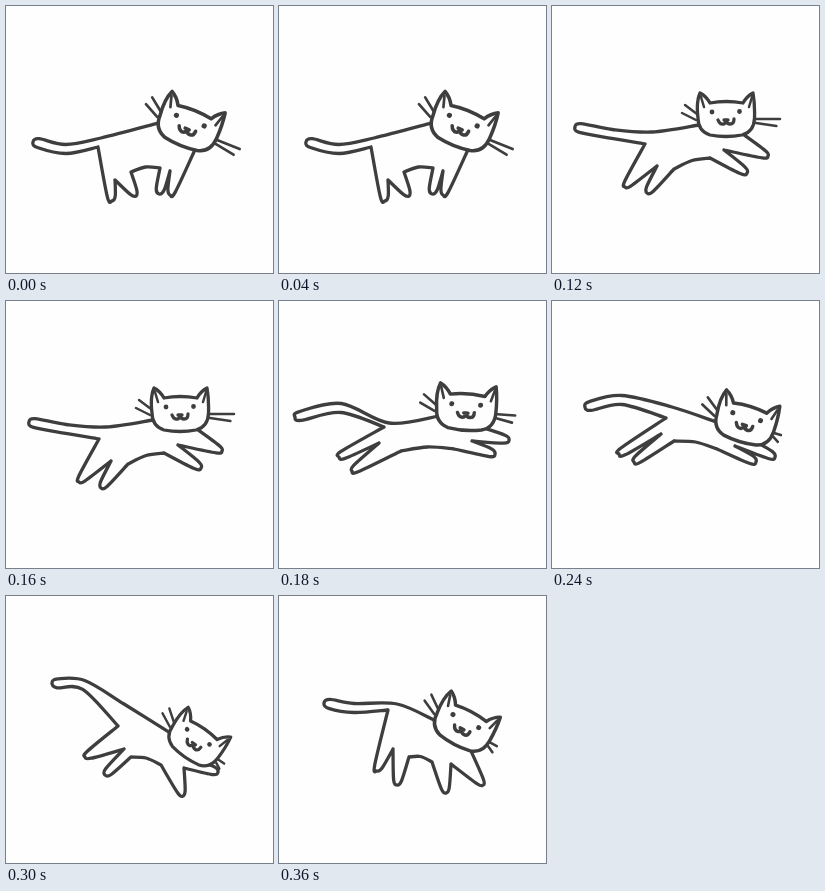
Animation, 267 px wide and 267 px high, one loop 420 ms. Source, as an HTML page:

```html
<!DOCTYPE html>
<html lang="en">
<head>
<meta charset="utf-8">
<title>Running cat</title>
<style>
html, body { margin: 0; width: 100%; height: 100%; overflow: hidden; background: #fefefe; }
svg { display: block; width: 100%; height: 100%; filter: blur(.45px); }
path { fill: none; stroke: #3e3e3e; stroke-width: 3.3; stroke-linecap: round; stroke-linejoin: round; }
#face { fill: #fefefe; }
#eyes { stroke-width: 4.8; }
#ears, #whiskers { stroke-width: 2.5; }
</style>
</head>
<body>
<svg viewBox="0 0 267 267">
  <path id="body"/>
  <g id="head">
    <path id="face" d="M-28 0Q-30 -16 -26 -25Q-20 -22 -16 -15Q0 -18 17 -15Q21 -22 27 -25Q29 -14 28.5 0Q28 14 16 17Q0 20 -16 17Q-28 13 -28 0Z"/>
    <path id="ears" d="M-25 -21L-22 -11M26 -21L23 -11"/>
    <path id="eyes" d="M-14 -6h.01M13.5 -6.5h.01"/>
    <path id="mouth" d="M-8 2Q-6 7 -2 6Q0 5 0 2Q1 6 4 6Q8 6 8 1M-2 2h4"/>
    <path id="whiskers"/>
  </g>
</svg>
<script>
const HOLD = 60, TAIL = 4.5, PAW = 4;

// head: x, y, angle, scale, length of the right whiskers
// joints, around the outline: tail root, bend, tip, rump,
// hind paw, crotch, hind paw, groin, chest, fore paw, crotch, fore paw
const poses = [
  { head: [182, 121, 22, 1.08, 22],
    joints: "95,132 60,143 27,136 92,141 106,195 109,174 130,190 125,166 154,162 153,188 164,165 164,189" },
  { head: [179, 116, 8, 1.1, 20],
    joints: "95,137 68,145 37,129 94,147 81,197 105,167 106,200 115,172 152,156 174,181 165,149 204,161" },
  { head: [174, 112, 0, 1, 24],
    joints: "100,126 60,128 23,121 93,138 73,181 105,160 95,187 122,163 158,152 195,167 172,144 216,150" },
  { head: [187, 110, 4, 1.05, 17],
    joints: "110,122 62,107 16,116 105,126 60,156 100,142 73,170 122,150 175,148 216,153 193,140 230,139" },
  { head: [193, 122, 17, 1.05, 6],
    joints: "120,106 70,99 33,106 114,117 67,153 109,133 82,161 122,140 165,148 204,161 183,145 223,156" },
  { head: [189, 146, 35, .98, 7],
    joints: "118,108 78,89 46,87 112,130 79,161 118,153 99,179 125,161 155,169 177,200 178,172 212,176" },
  { head: [184, 131, 28, 1.05, 7],
    joints: "118,108 75,112 45,107 109,114 98,175 114,153 118,189 130,161 153,166 167,197 172,168 204,189" }
];

const middle = (a, b) => [(a[0] + b[0]) / 2, (a[1] + b[1]) / 2];

// Point reached from p by going along and across the direction a to b
function offset(p, a, b, along, across) {
  const dx = b[0] - a[0], dy = b[1] - a[1], len = Math.hypot(dx, dy);
  return [p[0] + (dx * along - dy * across) / len, p[1] + (dy * along + dx * across) / len];
}

// Three points that round off a limb
const round = (from, tip, r) =>
  [offset(tip, from, tip, -1.2 * r, r), tip, offset(tip, from, tip, -1.2 * r, -r)];

const leg = (a, paw, b) => [a, ...round(middle(a, b), paw, PAW), b];

// Catmull-Rom curve through the points, as cubic Béziers
function curve(p) {
  const at = i => p[Math.max(0, Math.min(p.length - 1, i))];
  const handle = (i, side) => at(i).map((v, k) => v + side * (at(i + 1)[k] - at(i - 1)[k]) / 6);
  let d = "M" + p[0];
  for (let i = 1; i < p.length; i++) d += `C${handle(i - 1, 1)} ${handle(i, -1)} ${p[i]}`;
  return d;
}

function outline({ head: [x, y, angle, scale], joints }) {
  const [root, bend, tip, rump, hind1, hindGap, hind2, groin, chest, fore1, foreGap, fore2] =
    joints.split(" ").map(s => s.split(",").map(Number));
  const c = scale * Math.cos(angle * Math.PI / 180), s = scale * Math.sin(angle * Math.PI / 180);
  const onHead = (u, v) => [x + u * c - v * s, y + u * s + v * c];
  const neck = onHead(-27, 7), throat = onHead(14, 14);
  const [bx, by] = middle(groin, chest);
  const tailSide = side => offset(bend, root, tip, 0, side * TAIL);
  return [
    [neck, root, tailSide(1), ...round(bend, tip, TAIL), tailSide(-1), rump],
    leg(rump, hind1, hindGap),
    leg(hindGap, hind2, groin),
    [groin, [bx, by - 3], chest],
    leg(chest, fore1, foreGap),
    leg(foreGap, fore2, throat)
  ].map(curve).join("");
}

const set = (id, name, value) => document.getElementById(id).setAttribute(name, value);
let shown = -1;

function draw(now) {
  const i = Math.floor(now / HOLD) % poses.length;
  if (i === shown) return;
  shown = i;
  const [x, y, angle, scale, whisker] = poses[i].head;
  set("body", "d", outline(poses[i]));
  set("head", "transform", `translate(${x} ${y}) rotate(${angle}) scale(${scale})`);
  set("whiskers", "d", `M-44 -5L-30 2M-41 -13L-29 -4M30 1h${whisker}M30 5l${whisker * .85} 3`);
}

const start = performance.now();
function tick() {
  draw(performance.now() - start);
  requestAnimationFrame(tick);
}
tick();
</script>
</body>
</html>
```
